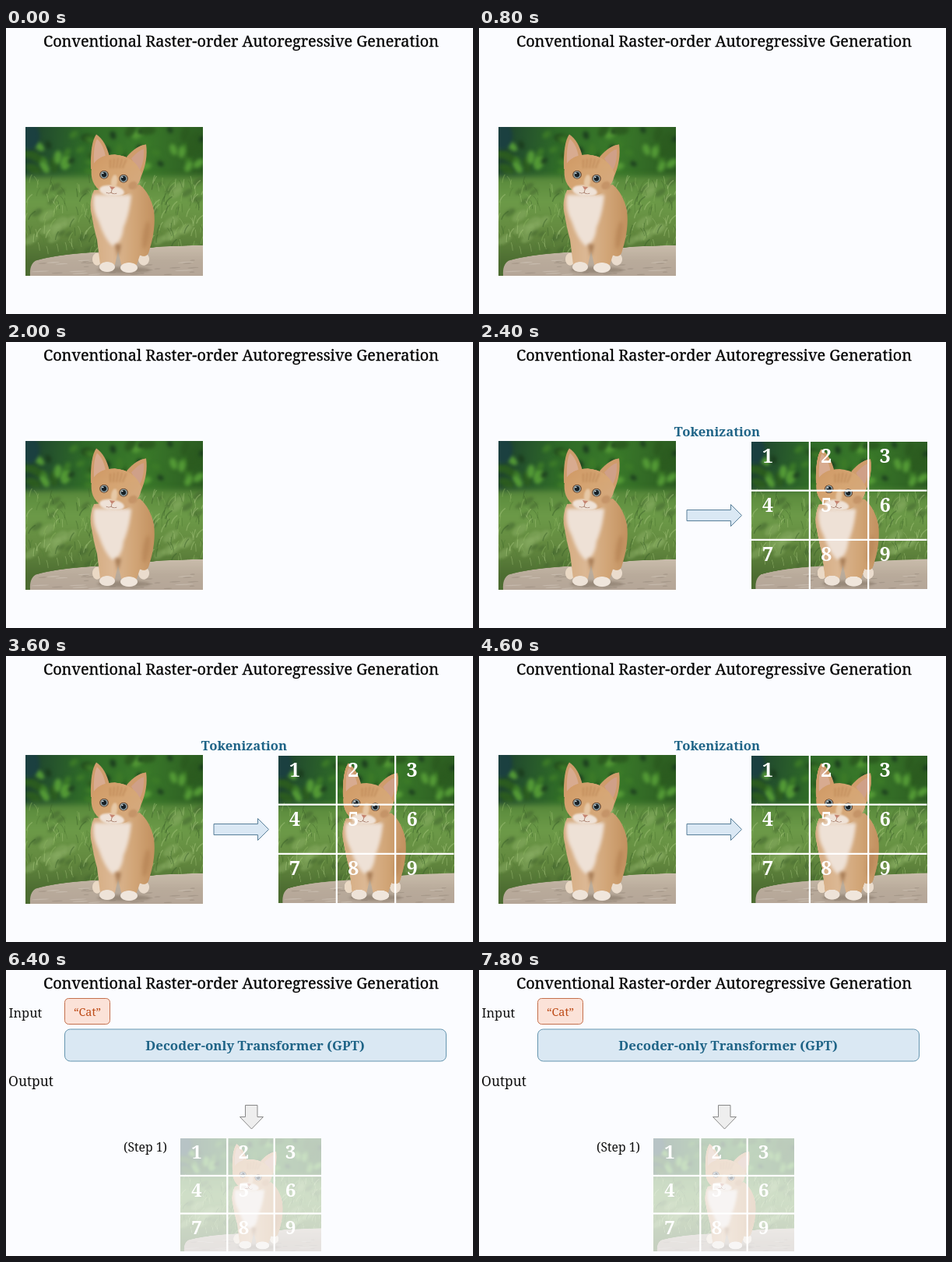
An HTML page with a canvas for the animation above (8 s loop, 600x367 px).

```html
<!DOCTYPE html>
<html lang="en">
<head>
<meta charset="utf-8">
<title>Raster-order generation</title>
<style>
html, body { margin: 0; width: 100%; height: 100%; overflow: hidden; background: #fbfcff; }
canvas { display: block; width: 100%; height: 100%; }
</style>
</head>
<body>
<canvas id="stage" width="600" height="367"></canvas>
<script>
const LOOP = 8000, TOKENS_AT = 2400, DECODER_AT = 5000;
const ctx = document.getElementById('stage').getContext('2d');
const photo = paintPhoto();

function random(seed) {
  return () => (seed = (seed * 16807) % 2147483647) / 2147483647;
}

// The kitten picture, painted once in a 228 x 192 space.
function paintPhoto() {
  const canvas = document.createElement('canvas');
  canvas.width = 456;
  canvas.height = 384;
  const g = canvas.getContext('2d');
  const rnd = random(71);
  g.scale(2, 2);

  const gradient = (x0, y0, x1, y1, colors) => {
    const fill = g.createLinearGradient(x0, y0, x1, y1);
    colors.forEach((c, i) => fill.addColorStop(i / (colors.length - 1), c));
    return fill;
  };
  const oval = (x, y, rx, ry, color, turn = 0) => {
    g.fillStyle = color;
    g.beginPath();
    g.ellipse(x, y, rx, ry, turn, 0, 7);
    g.fill();
  };
  const shape = (d, color) => {
    g.fillStyle = color;
    g.fill(new Path2D(d));
  };
  const scatter = (count, draw) => {
    for (let i = 0; i < count; i++) draw(rnd(), rnd(), rnd());
  };

  // Foliage
  g.fillStyle = gradient(0, 0, 228, 20, ['#1d4030', '#2f6a28', '#3a7a2a', '#2c5c22']);
  g.fillRect(0, 0, 228, 192);
  g.filter = 'blur(5px)';
  scatter(60, (a, b, c) => oval(a * 228, 3 + b * 55, 4 + c * 7, 3 + c * 3,
    ['#1b3d1e', '#3c7a28', '#549a36', '#2c5c20'][Math.floor(c * 4)], a * 9));
  oval(4, 12, 14, 18, '#1b4040');

  // Grass
  g.filter = 'blur(8px)';
  g.fillStyle = gradient(0, 58, 0, 175, ['#548538', '#6c9a48', '#63893f', '#4c6c31']);
  g.fillRect(-20, 64, 268, 150);
  g.filter = 'blur(3px)';
  scatter(50, (a, b, c) => oval(a * 228, 70 + b * 98, 4 + c * 8, 2 + c * 4,
    c < 0.5 ? '#41632e80' : '#8aae6480', -0.6));
  g.filter = 'blur(0.6px)';
  g.lineCap = 'round';
  scatter(260, (a, b, c) => {
    const x = a * 236 - 4, y = 72 + b * 98, lean = (c - 0.4) * 15;
    g.strokeStyle = ['#8bb45f70', '#3b622980', '#a9c88070', '#547f3680'][Math.floor(c * 40) % 4];
    g.lineWidth = 0.6 + c;
    g.beginPath();
    g.moveTo(x, y);
    g.quadraticCurveTo(x + lean * 0.2, y - 6, x + lean, y - 10);
    g.stroke();
  });

  // Stone
  shape('M6 192Q5 178 13 173Q40 165 92 162Q150 158 172 155L228 153V192Z',
    gradient(0, 155, 0, 192, ['#c8bbaa', '#b9ab9b', '#b5a698']));
  scatter(30, (a, b, c) => oval(14 + a * 214, 172 + b * 19, 3 + c * 9, 0.7,
    c < 0.5 ? '#83776a50' : '#d9cfc370', -0.05));
  g.filter = 'blur(3px)';
  oval(126, 185, 34, 4, '#7a6c5c80');
  g.filter = 'blur(0.6px)';

  // Body and legs
  oval(92, 171, 6, 8, '#ead9c5');
  oval(152, 171, 7, 8, '#eadccd');
  shape('M88 82Q81 98 85 114Q88 132 92 146L96 178Q105 185 115 178L119 160L123 178'
    + 'Q134 185 143 178L147 166Q157 170 159 160Q168 132 165 108Q160 86 147 75Z',
    gradient(84, 0, 167, 0, ['#d5ab80', '#dcb894', '#d2a678', '#c2905e']));
  g.filter = 'blur(4px)';
  shape('M88 88Q85 106 94 122Q102 146 112 154Q124 150 126 130Q134 112 136 88Z', '#eee1d6');
  shape('M115 152L119 168L123 152Z', '#a57a54');
  oval(155, 140, 4, 18, '#b07c4e80', 0.15);
  g.filter = 'blur(0.6px)';
  oval(105, 181, 10, 6.5, '#eee3d8');
  oval(133, 182, 11, 6.5, '#f0e6dc');

  // Ears and head
  shape('M84 55Q83 21 91 10Q103 18 108 39Z', '#cf9c6c');
  shape('M88 48Q87 24 92 16Q101 24 103 40Z', '#d8ab90');
  shape('M130 39Q143 24 155 23Q158 43 148 66Z', '#cf9c6c');
  shape('M136 41Q146 30 152 29Q153 46 146 58Z', '#cfa088');
  shape('M85 52Q93 36 115 36Q140 38 149 60Q148 78 130 87Q112 94 98 84Q82 74 85 52Z',
    gradient(90, 36, 140, 90, ['#d09a66', '#d6a674', '#d5aa80']));
  g.filter = 'blur(2px)';
  oval(111, 83, 16, 7, '#efe2d7', 0.15);
  oval(114, 71, 4, 9, '#e6c8a6', 0.15);
  oval(138, 76, 6, 5, '#b9855890', -0.5);
  g.strokeStyle = '#b17a4a90';
  g.lineWidth = 1.6;
  for (let i = -2; i < 3; i++) {
    g.beginPath();
    g.moveTo(119 + i * 5, 41 + Math.abs(i));
    g.lineTo(117 + i * 4, 53);
    g.stroke();
  }
  g.filter = 'none';

  for (const [x, y] of [[101, 62], [126, 67]]) {
    oval(x, y, 5.8, 5.4, '#6c4a33');
    oval(x, y, 4.7, 4.6, '#8ea3a8');
    oval(x, y, 3.2, 3.4, '#172026');
    oval(x - 1.5, y - 1.7, 0.9, 0.9, '#fff');
  }
  shape('M108 77L115 78L111 82Z', '#c58470');
  g.strokeStyle = '#94634f';
  g.lineWidth = 0.7;
  g.stroke(new Path2D('M111 82L110 85Q107 87 104 85M110 85Q114 88 117 86'));
  return canvas;
}

function text(str, x, y, size, color = '#111', weight = 400, align = 'left') {
  ctx.font = `${weight} ${size}px "Noto Serif", serif`;
  ctx.textAlign = align;
  ctx.fillStyle = color;
  ctx.fillText(str, x, y);
}

function paint(path, fill, stroke) {
  ctx.fillStyle = fill;
  ctx.fill(path);
  ctx.strokeStyle = stroke;
  ctx.lineWidth = 1;
  ctx.stroke(path);
}

function box(x, y, w, h, r, fill, stroke) {
  const path = new Path2D();
  path.roundRect(x, y, w, h, r);
  paint(path, fill, stroke);
}

function tokens(x, y, w, h, alpha, size, dx, dy) {
  ctx.globalAlpha = alpha;
  ctx.drawImage(photo, x, y, w, h);
  ctx.globalAlpha = 1;
  ctx.fillStyle = '#fff';
  for (let i = 1; i < 3; i++) {
    ctx.fillRect(x + w * i / 3 - 1.1, y, 2.2, h);
    ctx.fillRect(x, y + h * i / 3 - 1.1, w, 2.2);
  }
  for (let i = 0; i < 9; i++) {
    text(i + 1, x + dx + (i % 3) * w / 3, y + dy + Math.floor(i / 3) * h / 3,
      size, '#fff', 700, 'center');
  }
}

function title() {
  const str = 'Conventional Raster-order Autoregressive Generation';
  text(str, 302, 24, 19.83, '#000', 400, 'center');
  ctx.strokeStyle = '#000';
  ctx.lineWidth = 0.3;
  ctx.strokeText(str, 302, 24);
}

function photoScene() {
  ctx.drawImage(photo, 25, 126.5, 228, 191);
}

function tokenScene() {
  photoScene();
  text('Tokenization', 306, 121, 16.7, '#1f6487', 700, 'center');
  paint(new Path2D('M267 215.5H323.5V208.5L337.5 222.5L323.5 236.5V229.5H267Z'),
    '#dae8f4', '#587f99');
  tokens(349.5, 127.5, 226, 189.5, 1, 25, 21.5, 27);
}

function decoderScene() {
  text('Input', 3.5, 61, 16.4);
  text('Output', 3, 149, 17.4);
  box(75.5, 36.5, 58, 33, 5, '#fbe2d8', '#c46f4c');
  text('“Cat”', 104.5, 59, 14.4, '#bd4a16', 400, 'center');
  box(75.5, 76, 490, 41, 7, '#dae8f3', '#6595af');
  text('Decoder-only Transformer (GPT)', 320, 103, 16.9, '#1f6487', 700, 'center');
  paint(new Path2D('M307.5 173.5H323V188.5H330.5L315.5 204L300.5 188.5H307.5Z'),
    '#eeeeee', '#888888');
  text('(Step 1)', 179, 233, 15.7, '#111', 400, 'center');
  tokens(224, 215.5, 181, 145.5, 0.3, 24, 21, 26.5);
}

function draw(now) {
  const t = now % LOOP;
  ctx.fillStyle = '#fbfcff';
  ctx.fillRect(0, 0, 600, 367);
  title();
  if (t < TOKENS_AT) photoScene();
  else if (t < DECODER_AT) tokenScene();
  else decoderScene();
  requestAnimationFrame(draw);
}

draw(0);
</script>
</body>
</html>
```
